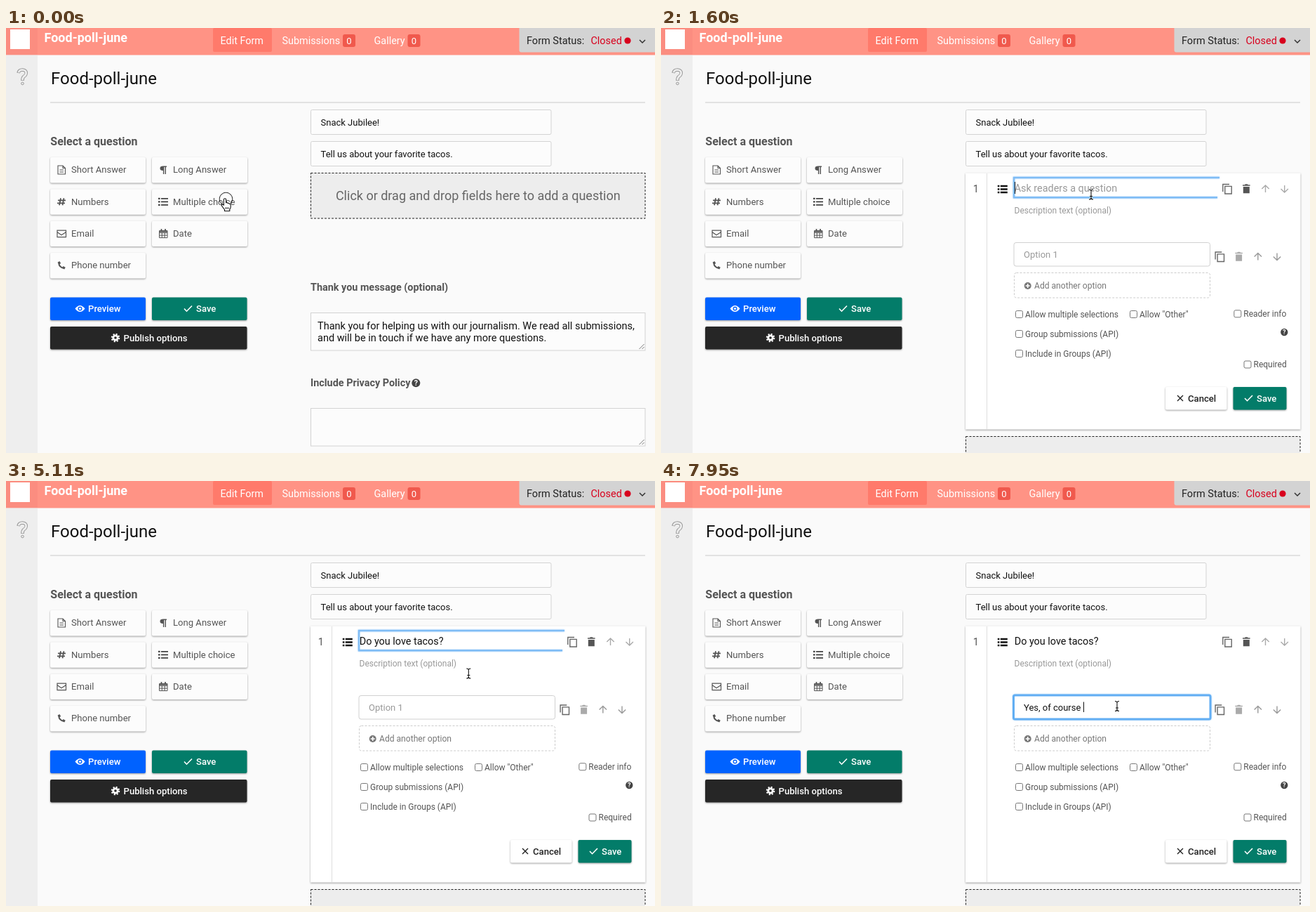
Recreate the animation shown at these times as an HTML page. Size 925 by 605 pixels, loop 8 s.

```html
<!DOCTYPE html>
<html lang="en">
<head>
<meta charset="utf-8">
<title>Form editor</title>
<style>
html, body { margin: 0; width: 100%; height: 100%; overflow: hidden; background: #fafafa; }
svg { display: block; width: 925px; height: 605px; font-family: Roboto, sans-serif; }
text { white-space: pre; }
.btn { filter: drop-shadow(0 1px 1.2px rgba(0,0,0,.38)); }
.glow { filter: drop-shadow(0 0 .8px #a5d2f9); }
</style>
</head>
<body>
<svg id="stage" viewBox="0 0 925 605"></svg>
<script>
const stage = document.getElementById('stage');
const $ = id => document.getElementById(id);

const text = (x, y, s, size, fill = '#555', more = '') =>
  `<text x="${x}" y="${y}" font-size="${size}" fill="${fill}" ${more}>${s}</text>`;
const rect = (x, y, w, h, fill, more = '') =>
  `<rect x="${x}" y="${y}" width="${w}" height="${h}" fill="${fill}" ${more}/>`;
const line = (d, color = '#555', w = 1.3, more = '') =>
  `<path d="${d}" fill="none" stroke="${color}" stroke-width="${w}" ${more}/>`;
const fill = (d, color = '#555', more = '') => `<path d="${d}" fill="${color}" ${more}/>`;
const dot = (x, y, r, color, more = '') => `<circle cx="${x}" cy="${y}" r="${r}" fill="${color}" ${more}/>`;
const at = (x, y, s) => `<g transform="translate(${x} ${y})">${s}</g>`;
const group = (id, s) => `<g id="${id}">${s}</g>`;
const bold = 'font-weight="700"', medium = 'font-weight="500"', middle = 'text-anchor="middle"';

// Icons are drawn around 0,0
const list = (color, w) => line('M-3-4.5H7M-3 0H7M-3 4.5H7', color, w) +
  line('M-7-4.5H-4.4M-7 0H-4.4M-7 4.5H-4.4', color, w + .4);
const icon = {
  doc: line('M-5-6H2L5.5-2.5V6H-5ZM2-6V-2.5H5.5M-2.5 0H3M-2.5 3H3', '#555', 1.1),
  para: fill('M0-5.5H5V-4H4V6H2.6V-4H1.3V6H-.1V1Q-4.5 1-4.5-2.3Q-4.5-5.5 0-5.5Z'),
  hash: line('M-1-5L-3 5M3.5-5L1.5 5M-5-2H6M-6 2H5', '#555', 1.8),
  list: list('#444', 1.8),
  boldList: list('#111', 2.3),
  mail: line('M-6-4.5H6.5V5H-6ZM-6-2L0 2.2L6.5-2', '#555', 1.2),
  date: line('M-5.5-4H6V6H-5.5ZM-5.5-1H6M-1.7-1V6M2.2-1V6M-5.5 2.5H6', '#555', 1) +
    line('M-5.5-3H6', '#555', 2) + line('M-2.5-6.5V-3M3-6.5V-3', '#555', 1.8),
  phone: line('M-3.8-4Q-3.5 3 4 4.2', '#555', 2) + line('M-4-5.2L-2.2-2M1.8 2.5L5 4.2', '#555', 3.2),
  eye: fill('M-7 0Q0-9 7 0Q0 9-7 0Z', '#fff') + dot(0, 0, 3, '#0062ff') + dot(0, 0, 1.6, '#fff'),
  check: line('M-5.5 0L-2 3.7L5.5-4', '#fff', 1.6),
  gear: dot(0, 0, 3.2, 'none', 'stroke="#fff" stroke-width="2.8"') +
    dot(0, 0, 5.2, 'none', 'stroke="#fff" stroke-width="2.2" stroke-dasharray="2.05 2.03"'),
  cross: line('M-4-4L4 4M4-4L-4 4', '#222', 1.4),
  help: dot(0, 0, 6, '#444') + text(0, 4, '?', 10.5, '#fff', bold + middle),
  plus: dot(0, 0, 5, '#777') + line('M-3 0H3M0-3V3', '#fff', 1.6)
};
const copy = line('M-6.2 4V-6.5H3M-3.2-3.6H6.2V7H-3.2Z', '#666', 1.4);
const trash = c => fill('M-4.5-3H4.5V6.2H-4.5ZM-5.3-5.7H-2.5L-1.5-6.7H1.5L2.5-5.7H5.3V-4.2H-5.3Z', c);
const arrow = (c, dir) => line('M0 5V-5M-5.2 0L0-5L5.2 0', c, 1.4, `transform="scale(1 ${dir})"`);
const tools = (x, y, bin, arr) => at(x, y, copy) + at(x + 27.3, y, trash(bin)) +
  at(x + 54.5, y, arrow(arr, 1)) + at(x + 81.7, y, arrow(arr, -1));

const badge = x => rect(x, 9, 18, 18, '#f0594d', 'rx="3"') + text(x + 9, 22.5, '0', 13, '#fff', middle);
const question = (col, row, name, ic) => {
  const x = 63 + col * 145, y = 184 + row * 45.3;
  return rect(x, y, 136, 36.5, '#fcfcfc', 'rx="2" class="btn"') +
    at(x + 16, y + 18, icon[ic]) + text(x + 30, y + 22.3, name, 13.1);
};
const action = (x, y, w, color, ic, ix, name, tx) =>
  rect(x, y, w, 32.5, color, 'rx="2" class="btn"') + at(ix, y + 16, icon[ic]) +
  text(tx, y + 20.5, name, 13.1, '#fff', medium);
const field = (y, s) => rect(434.5, y, 342.5, 35, '#fcfcfc', 'rx="2" stroke="#d3d3d3"') +
  text(448.5, y + 22, s, 13, '#111');
const area = y => rect(434.5, y, 476.5, 53.5, '#fcfcfc', 'stroke="#d3d3d3"') +
  line(`M902.5 ${y + 51.5}l7-7M906.5 ${y + 51.5}l3-3`, '#777', 1);
const check = (x, y, s) => rect(x, y, 10, 10, '#fff', 'rx="2" stroke="#777"') + text(x + 13.5, y + 9.3, s, 12);

const header =
  rect(0, 0, 925, 38.5, '#ff9385') + rect(0, 0, 45, 38.5, '#fb8d80') +
  rect(0, 38.5, 45, 567, '#eee') + rect(6, 2, 28, 28, '#fff') +
  text(54.5, 20, 'Food-poll-june', 18, '#fff', bold) +
  rect(295, 0, 84, 34, '#ff7a6b', 'rx="2"') +
  text(305.5, 23, 'Edit Form', 14.4, '#fff') +
  text(393.5, 23, 'Submissions', 14.4, '#fff') + badge(480) +
  text(524.5, 23, 'Gallery', 14.4, '#fff') + badge(572.5) +
  rect(731.5, -4, 197, 38.4, '#d3d3d3', 'rx="3"') +
  text(742, 23, 'Form Status:', 14.5, '#222') + text(833.5, 23, 'Closed', 14.4, '#d8001d') +
  dot(886, 18, 4.6, '#d8001d') + line('M903 17L907 21L911 17', '#333', 1.5) +
  line('M17.5 64Q18.5 59.5 23.5 59.5Q29 60 28.7 64.5Q28.3 67.5 25 69.5Q23.5 71 23.5 75', '#999', 4.6) +
  line('M17.9 63.3Q18.9 59.5 23.5 59.5Q29 60 28.7 64.5Q28.3 67.5 25 69.5Q23.5 71 23.5 74.2', '#eee', 2.7) +
  dot(23.5, 79, 1.8, '#eee', 'stroke="#999"') +
  text(64, 80.3, 'Food-poll-june', 24, '#111') + line('M63 106H911', '#ccc', 1.2);

const left =
  text(63.3, 166.5, 'Select a question', 16, '#555', bold) +
  question(0, 0, 'Short Answer', 'doc') + question(1, 0, 'Long Answer', 'para') +
  question(0, 1, 'Numbers', 'hash') + question(1, 1, 'Multiple choice', 'list') +
  question(0, 2, 'Email', 'mail') + question(1, 2, 'Date', 'date') +
  question(0, 3, 'Phone number', 'phone') +
  action(63, 383.5, 136, '#0062ff', 'eye', 105.5, 'Preview', 117) +
  action(208, 383.5, 135.5, '#037c69', 'check', 259.5, 'Save', 271) +
  action(63, 425, 280.5, '#262626', 'gear', 156, 'Publish options', 167.5);

const lower =
  text(434, 373.5, 'Thank you message (optional)', 14.4, '#555', bold) + area(405.5) +
  text(444, 428.8, 'Thank you for helping us with our journalism. We read all submissions,', 14.5, '#111') +
  text(444, 445.8, 'and will be in touch if we have any more questions.', 14.5, '#111') +
  text(434, 509.5, 'Include Privacy Policy', 14.4, '#555', bold) + at(584.3, 505.3, icon.help) + area(541.5);

const zone = rect(434.5, 206.5, 476.5, 64.5, '#ededed', 'stroke="#222" stroke-dasharray="3 2"') +
  text(672.8, 245.3, 'Click or drag and drop fields here to add a question', 18, '#666', middle);

const cardBase = h => rect(434, 206.5, 477.5, h, '#fff', 'class="btn"') + line(`M464.5 207V${206 + h}`, '#ddd', 1) +
  text(448.7, 234.3, '1', 14.4, '#555', middle) + tools(807, 229, '#555', '#aaa');

const closed = cardBase(45.5) + at(488.5, 229.5, icon.boldList) + text(510.8, 234.3, 'Ask readers a question', 14.5, '#666');

const open = cardBase(365) + at(486.8, 229.5, icon.boldList) +
  group('titleRing', line('M796 213H503V241.2H793', '#7fbcf5', 2.4, 'class="glow"')) +
  text(503.7, 232.8, '', 14.4, '#111', 'id="title"') +
  text(503.5, 264, 'Description text (optional)', 12, '#999') +
  rect(503, 305.5, 279.5, 33.5, '#fff', 'rx="3" stroke="#d0d0d0"') +
  group('optionRing', rect(502.5, 305, 280.5, 34, '#fff', 'rx="2" stroke="#62aef3" stroke-width="3" class="glow"')) +
  text(517, 326.8, '', 13, '#111', 'id="option"') + tools(796.3, 325.5, '#aaa', '#999') +
  rect(503.5, 348.5, 279, 35.5, 'none', 'rx="3" stroke="#ccc" stroke-dasharray="3 2"') +
  at(522.7, 367, icon.plus) + text(532, 371.3, 'Add another option', 12.1, '#777') +
  check(505.5, 402.5, 'Allow multiple selections') + check(668.5, 402.5, 'Allow "Other"') +
  check(816.8, 401.8, 'Reader info') + check(505.5, 430.5, 'Group submissions (API)') +
  check(505.5, 458.5, 'Include in Groups (API)') + check(831, 474, 'Required') +
  at(888.3, 433, `<g transform="scale(.86)">${icon.help}</g>`) +
  action(719, 511, 87.5, '#fff', 'cross', 740, '', 0) + text(751, 531.5, 'Cancel', 13.1, '#222', medium) +
  action(815.5, 511, 76, '#037c69', 'check', 837.5, 'Save', 849) +
  rect(0, 0, 1, 17, '#111', 'id="caret"');

const hand = fill('M-1.6 9V1.2Q-1.6-.2 0-.2Q1.6-.2 1.6 1.2V5.6Q3.6 5 4 6.4Q5.8 5.8 6.2 7.2Q8.2 7 8.2 9V12Q8 14 6.8 15V17.5H-.5V15.5Q-2.5 13-4.8 9.6Q-4.8 8-3.2 8Z', '#fff',
  'stroke="#111" stroke-width="1.1"') + line('M1 12V15M3 12V15M5 12V15', '#111', .8);
const pointer = fill('M0 0V13.2L3 10.4L5 15.2L7.4 14.2L5.4 9.6H9.4Z', '#111', 'stroke="#fff" stroke-width=".8"');
const beamPath = 'M-3-7Q0-7 0-5V5Q0 7-3 7M3-7Q0-7 0-5M0 5Q0 7 3 7M-2 2.5H2';
const beam = line(beamPath, '#fff', 2.6, 'opacity=".7"') + line(beamPath, '#111', 1.1);

stage.innerHTML = rect(0, 0, 925, 605, '#fafafa') + header + left +
  field(116.5, 'Snack Jubilee!') + field(161.5, 'Tell us about your favorite tacos.') +
  group('lower', lower) + group('zone', zone) + group('closed', closed) + group('open', open) +
  dot(313.5, 243.5, 9.3, 'none', 'id="ring" stroke="#222"') +
  group('hand', hand) + group('pointer', pointer) + group('beam', beam);

const show = (id, on) => $(id).setAttribute('display', on ? 'inline' : 'none');
const move = (id, x, y) => $(id).setAttribute('transform', `translate(${x} ${y})`);
const during = (t, a, b) => t >= a && t < b;
const part = (t, a, b) => Math.min(1, Math.max(0, (t - a) / (b - a)));
const mix = (a, b, p) => a + (b - a) * p;
const smooth = p => p * p * (3 - 2 * p);

// Each run: characters, time of the first, time of the last
const typed = (t, runs) => runs.map(([s, a, b]) =>
  t < a ? '' : s.slice(0, 1 + Math.floor(part(t, a, b) * (s.length - 1)))).join('');
const titleRuns = [['Do', 3090, 3150], [' you love ', 3300, 4060], ['ta', 4120, 4180], ['cos?', 4290, 4610]];
const optionRuns = [['Yes, ', 6710, 7060], ['of course', 7210, 7800], [' ', 7950, 7951]];

function cursor(t) {
  if (t < 900) {
    const p = part(t, 730, 900);
    return [mix(312, 506, p ** 1.3), mix(243, 258, p)];
  }
  if (t < 1600) {
    const p = 1 - (1 - part(t, 900, 1310)) ** 2;
    return [mix(506, 613, p), mix(258, 235.5, p * p)];
  }
  if (t < 4940) {
    const e = smooth(part(t, 1800, 2050));
    return [mix(613, 645, e) + (during(t, 2230, 2260) ? 7 : 0), 237];
  }
  const e = smooth(part(t, 4940, 5310)), q = 1 - e;
  return [645 * q * q + 2 * 672 * q * e + 650 * e * e, mix(237, 320.5, e)];
}

function putText(id, value, hint) {
  $(id).textContent = value || hint;
  $(id).setAttribute('fill', value ? '#111' : '#999');
}

function draw(t) {
  const added = t >= 430, opened = t >= 1600;
  show('closed', added && !opened);
  show('open', opened);
  move('zone', 0, opened ? 375 : added ? 56 : 0);
  move('lower', 0, added ? 27 : 0);
  show('lower', !opened);
  show('ring', t < 30 || during(t, 360, 430));

  const [x, y] = cursor(t);
  const kind = opened ? 'beam' : x < 344 || (x > 434 && y < 252) ? 'hand' : 'pointer';
  for (const id of ['hand', 'pointer', 'beam']) show(id, id === kind);
  move(kind, x, y);
  if (!opened) return;

  const inOption = t >= 5550;
  const option = during(t, 6030, 6380) ? 'Y' : typed(t, optionRuns);
  const title = typed(t, titleRuns);
  show('titleRing', t < 5520);
  show('optionRing', inOption);

  // Caret sits after the text that has been typed so far
  const [id, value, left, top] = inOption ? ['option', option, 517, 314.5] : ['title', title, 503.7, 219];
  $(id).textContent = value;
  $('caret').setAttribute('x', Math.round(left + (value ? $(id).getComputedTextLength() : 0)));
  $('caret').setAttribute('y', top);
  $('caret').setAttribute('height', inOption ? 14.5 : 17);
  show('caret', inOption || during(t, 1600, 1800) || during(t, 2230, 2740) || during(t, 3090, 5110));

  putText('title', title, 'Ask readers a question');
  putText('option', option, t < 6030 ? 'Option 1' : '');
}

const start = performance.now();
function tick() {
  draw((performance.now() - start) % 8000);
  requestAnimationFrame(tick);
}
tick();
</script>
</body>
</html>
```
